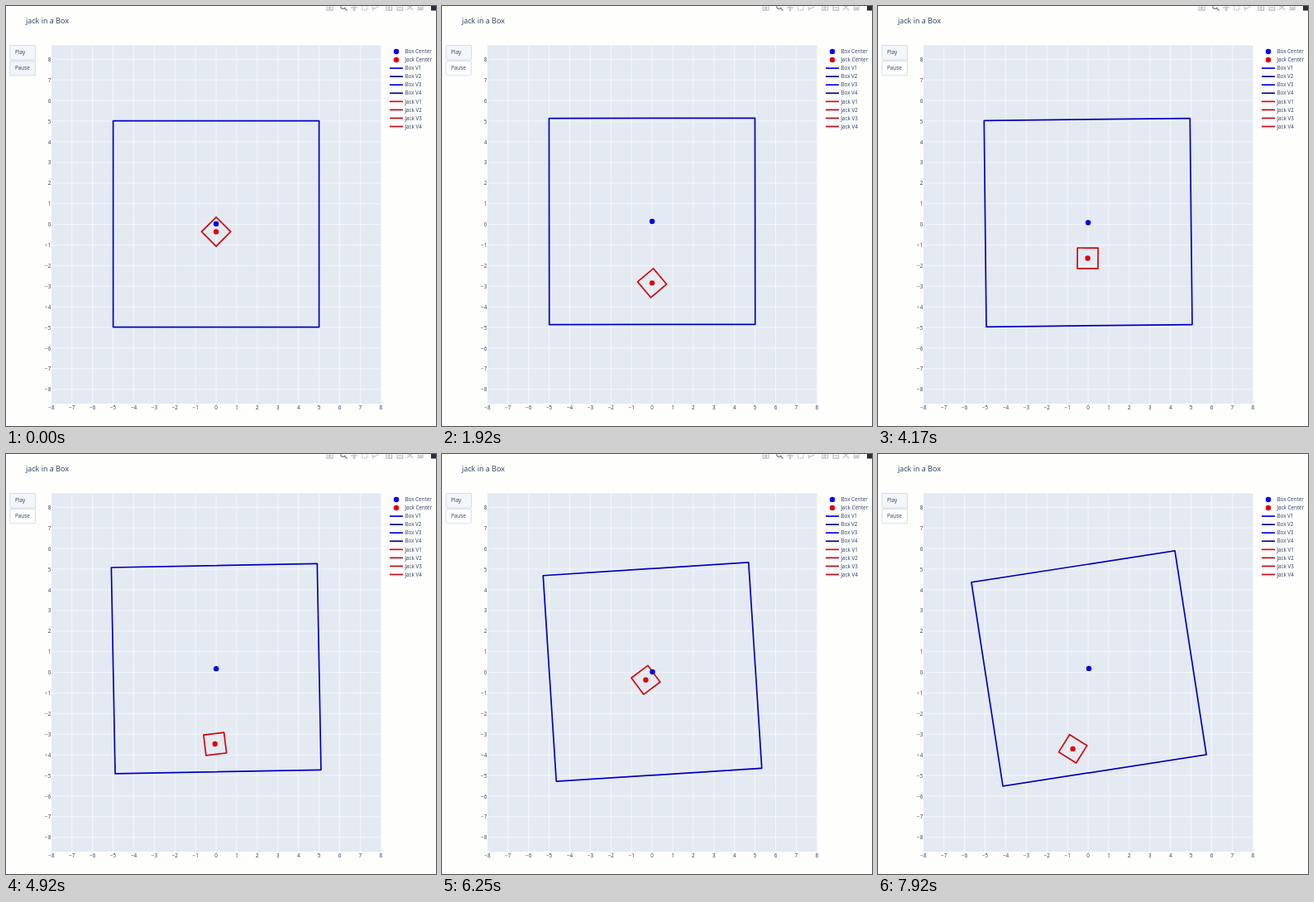
Write an HTML page that moves like this. It is 520 by 507 pixels and loops after 8000 ms.

```html
<!DOCTYPE html>
<html lang="en">
<head>
<meta charset="utf-8">
<title>jack in a Box</title>
<style>
  html, body { margin: 0; width: 100%; height: 100%; overflow: hidden; background: #fefefd; }
  svg { display: block; }
  text { font: 6.3px "Open Sans", sans-serif; fill: #2a3f5f; }
  .title { font-size: 9px; }
  .button { stroke: #bec8d9; stroke-width: .6; }
  .edge { fill: none; stroke-width: 1.7; stroke-linejoin: round; }
</style>
</head>
<body>
<svg id="stage" width="520" height="507" viewBox="0 0 520 507">
  <g id="modebar" fill="none" stroke="#c2c4c9" stroke-width="1.3">
    <path d="M388 0V5H395V0M390.5 1.5h2v1.5h-2z"/>
    <path stroke="#7d8088" d="M405 0a2.6 2.6 0 0 0 5 1.5M409.5 2.5L412.5 5.5"/>
    <path d="M417 2h8M421 0v5.5M419.5 4l1.5 1.5L422.5 4"/>
    <path stroke-dasharray="1.5 1" d="M430.5 0V5H437V0"/>
    <path d="M443 1c0 3 6 2 7-1M444 3l-1 2.5"/>
    <path d="M460 0V5H466.500V0M461.500 2h3.500M463.200 0v4"/>
    <path d="M473 0V5H479.500V0M474.500 2h3.500"/>
    <path d="M485 5L488.500 1.500L492 5M486 0l2.500 1.500L491 0"/>
    <path d="M498.500 0V4.500H500.500V2h1.500V4.500H504V0"/>
    <rect x="514" y="0" width="6" height="5.500" fill="#2b2d38" stroke="none"/>
  </g>
  <text class="title" x="24" y="20.800">jack in a Box</text>
  <rect class="button" x="4.800" y="47.500" width="30.700" height="17.500" rx="1.200" fill="#f3f7fa"/>
  <rect class="button" id="pause" x="4.800" y="66.500" width="30.700" height="17.300" rx="1.200"/>
  <text x="11" y="58">Play</text>
  <text x="11" y="76.800">Pause</text>
  <rect x="55" y="47.500" width="398.500" height="432.500" fill="#e4eaf2"/>
  <g id="axes"></g>
  <g id="legend"></g>
  <rect class="edge" id="box" x="-124.500" y="-124.500" width="249" height="249" stroke="#0000c4"/>
  <rect class="edge" id="jack" x="-12.450" y="-12.450" width="24.900" height="24.900" stroke="#d4060f"/>
  <circle id="boxDot" r="3.200" fill="#0000ee"/>
  <circle id="jackDot" r="3.200" fill="#e00008"/>
</svg>
<script>
const UNIT = 24.9, FPS = 12, LOOP = 8000, HALF_GRAVITY = 1.736, MASS_RATIO = 20;
const $ = id => document.getElementById(id);
const px = x => 254.1 + UNIT * x;
const py = y => 263.5 - UNIT * y;

function add(parent, tag, attrs, text = "") {
  const node = document.createElementNS(parent.namespaceURI, tag);
  for (const name in attrs) node.setAttribute(name, attrs[name]);
  node.textContent = text;
  parent.append(node);
}

const grid = { stroke: "#f8fafc", "stroke-width": .8 };
for (let n = -8; n <= 8; n++) {
  const label = String(n).replace("-", "\u2212");
  if (Math.abs(n) < 8) add($("axes"), "path", { d: `M${px(n)} 47.5V480`, ...grid });
  add($("axes"), "path", { d: `M55 ${py(n)}H453.5`, ...grid });
  add($("axes"), "text", { x: px(n), y: 487.2, "text-anchor": "middle" }, label);
  add($("axes"), "text", { x: 54.3, y: py(n) + 2.6, "text-anchor": "end" }, label);
}

const blues = ["#0000f0", "#00008e", "#0000e0", "#00009c"];
const reds = ["#dc0812", "#c40a16", "#d20a16", "#d20a16"];
const entries = [["Box Center", "#0000ee"], ["Jack Center", "#e00008"],
  ...blues.map((color, i) => ["Box V" + (i + 1), color]),
  ...reds.map((color, i) => ["Jack V" + (i + 1), color])];
entries.forEach(([name, color], i) => {
  const y = 55 + 10.05 * i;
  if (i < 2) add($("legend"), "circle", { cx: 472, cy: y, r: 3.2, fill: color });
  else add($("legend"), "path", { d: `M464 ${y}h16`, stroke: color, "stroke-width": 1.7 });
  add($("legend"), "text", { x: 482.4, y: y + 2.2 }, name);
});

// Free flight between impacts; tilts in degrees, speeds per second.
const flights = [
  { start: 1 / FPS, x: 0, vx: 0, y: 0, vy: 0, jack: 0, spin: 0, box: 0, boxSpin: 0 },
  { start: 1.64, x: 0, vx: -.008, y: -4.207, vy: 5.4, jack: 0, spin: 17.9, box: 0, boxSpin: .245 },
  { start: 4.76, x: -.023, vx: -.192, y: -4.246, vy: 5.187, jack: 52.2, spin: -89.9, box: .76, boxSpin: 1.96 },
  { start: 7.76, x: -.6, vx: -.9, y: -4.308, vy: 4.09, jack: -217.5, spin: -418, box: 6.64, boxSpin: 13.7 },
];
const paused = { x: 0, y: -.36, jack: 0, box: 0 };

function stateAt(time) {
  const flight = flights.findLast(f => time >= f.start - 1e-6);
  if (!flight) return paused;
  const t = time - flight.start;
  return {
    x: flight.x + flight.vx * t,
    y: flight.y + flight.vy * t - HALF_GRAVITY * t * t,
    jack: flight.jack + flight.spin * t,
    box: flight.box + flight.boxSpin * t,
  };
}

function place(id, x, y, angle) {
  $(id).setAttribute("transform", `translate(${px(x)} ${py(y)}) rotate(${angle})`);
}

function draw(now) {
  const time = Math.floor(((now % LOOP) + 5) / 1000 * FPS) % (LOOP / 1000 * FPS) / FPS;
  const { x, y, jack, box } = stateAt(time);
  // The box recoils so that the common centre of mass stays put.
  const boxX = -x / MASS_RATIO, boxY = -y / MASS_RATIO;
  place("box", boxX, boxY, -box);
  place("boxDot", boxX, boxY, 0);
  place("jack", x, y, 45 + jack);
  place("jackDot", x, y, 0);
  $("pause").setAttribute("fill", time ? "#fdfefe" : "#f1f5fa");
  $("modebar").setAttribute("opacity", Math.min(1, Math.max(0, (7.4 - time) / .3)));
}

const begin = performance.now();
function tick() {
  draw(performance.now() - begin);
  requestAnimationFrame(tick);
}
tick();
</script>
</body>
</html>
```
